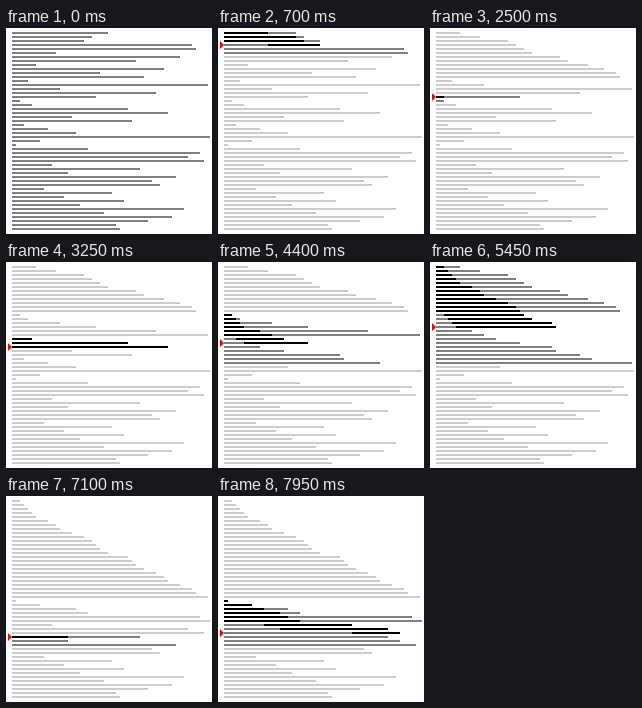
These frames come from a looping animation (206x206 px, 8 s). An HTML page with a canvas:

```html
<!DOCTYPE html>
<html lang="en">
<head>
<meta charset="utf-8">
<title>Merge sort</title>
<style>
  html, body { margin: 0; width: 100%; height: 100%; overflow: hidden; background: #fff; }
  canvas { display: block; width: 100%; height: 100%; }
</style>
</head>
<body>
<canvas id="stage" width="206" height="206"></canvas>
<script>
const ctx = document.getElementById('stage').getContext('2d');
const STEP_MS = 50, STEPS = 160;
const LEFT = 6, RIGHT = 204, PITCH = 4;
const LIGHT = '#ccc', DARK = '#808080', BLACK = '#000', RED = '#f00';

const values = [
  24, 20, 18, 45, 46, 11, 42, 31, 6, 38, 22, 33, 4, 49, 12, 36, 21, 2, 5, 29, 39, 15, 30, 3, 9,
  16, 50, 7, 1, 19, 47, 44, 48, 10, 32, 14, 41, 35, 37, 8, 25, 13, 28, 17, 43, 23, 40, 34, 26, 27
];

// Each step writes one merged value; "old" keeps the rows as they were before that merge.
const steps = [{ old: [...values], merged: values, lo: 0, hi: values.length, row: -1 }];

function mergeSort(a, lo, hi) {
  if (hi - lo < 2) return;
  const mid = (lo + hi) >> 1;
  mergeSort(a, lo, mid);
  mergeSort(a, mid, hi);
  const old = [...a];
  const merged = [...a];
  let i = lo, j = mid;
  for (let k = lo; k < hi; k++) {
    merged[k] = j >= hi || (i < mid && old[i] < old[j]) ? old[i++] : old[j++];
    steps.push({ old, merged, lo, hi, row: k });
  }
  for (let k = lo; k < hi; k++) a[k] = merged[k];
}
mergeSort([...values], 0, values.length);

function bar(row, value, color) {
  const end = Math.min(RIGHT, LEFT + value * PITCH);
  ctx.fillStyle = color;
  ctx.fillRect(LEFT, 4 + row * PITCH, end - LEFT, 2);
}

function arrow(row) {
  const y = 5 + row * PITCH;
  ctx.fillStyle = RED;
  ctx.beginPath();
  ctx.moveTo(2, y - 4);
  ctx.lineTo(6, y);
  ctx.lineTo(2, y + 4);
  ctx.fill();
}

function draw({ old, merged, lo, hi, row }) {
  ctx.fillStyle = '#fff';
  ctx.fillRect(0, 0, 206, 206);
  old.forEach((value, r) => {
    bar(r, value, r >= lo && r < hi ? DARK : LIGHT);
    if (r < lo || r > row) return;
    // The shorter of the two bars stays in front.
    bar(r, merged[r], BLACK);
    if (value < merged[r]) bar(r, value, DARK);
  });
  if (row >= 0) arrow(row);
}

const start = performance.now();
function tick() {
  const elapsed = performance.now() - start;
  draw(steps[Math.floor(elapsed / STEP_MS) % STEPS]);
  requestAnimationFrame(tick);
}
tick();
</script>
</body>
</html>
```
